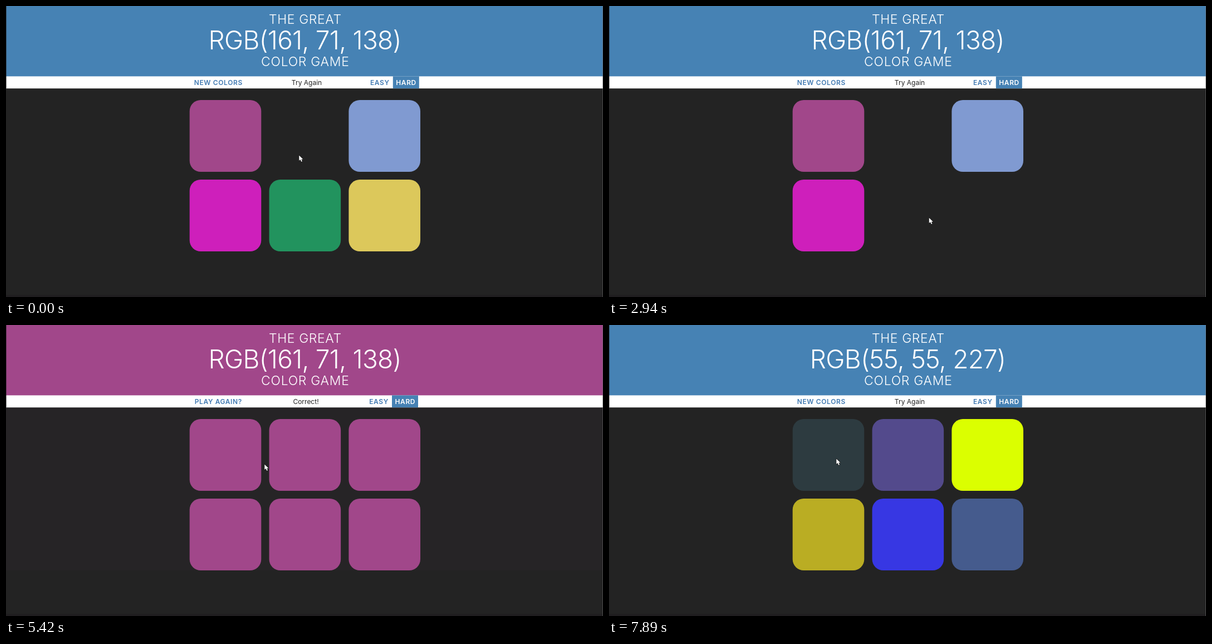
Animation of 1072 by 523 pixels, one loop 8 s. Source, as an HTML page with a canvas:

```html
<!DOCTYPE html>
<html lang="en">
<head>
<meta charset="utf-8">
<title>Color game</title>
<style>
  html, body { margin: 0; width: 100%; height: 100%; overflow: hidden; background: #232323; }
  canvas { display: block; width: 1072px; height: 523px; }
</style>
</head>
<body>
<canvas id="stage" width="1072" height="523"></canvas>
<script>
const ctx = document.getElementById('stage').getContext('2d');
const FONT = 'Inter, "Open Sans", sans-serif';
const BLUE = [70, 130, 180], GOAL = [161, 71, 138];
const LOOP = 8000, TICK = 143.3;
const NAV_TOP = 126.4, NAV_HEIGHT = 21.8;

// Moments of the clicks
const HIDE_GREEN = 2150, HIDE_YELLOW = 540, WIN = 3475, RESET = 6635, RETRY = 7691;

const firstRound = [GOAL, GOAL, [128, 154, 209], [206, 31, 187], [34, 147, 94], [220, 200, 91]];
const secondRound = [[86, 154, 178], [83, 74, 140], [219, 255, 0], [186, 173, 35], [55, 55, 227], [69, 91, 141]];
const firstHides = { 1: -LOOP, 4: HIDE_GREEN, 5: HIDE_YELLOW };
const secondHides = { 0: RETRY };

// The picture advances in bursts of ticks: [start, ticks]
const bursts = [[0, 1], [150, 2], [580, 3], [1780, 6], [2940, 7], [5420, 4], [6270, 8], [7460, 4]];

// Pointer moves: [start, end, x, y]
const moves = [
  [0, 0, 526, 268],
  [20, 290, 660, 379],
  [1660, 1780, 656, 383],
  [1780, 2070, 577, 382],
  [2900, 3400, 437, 279],
  [5250, 5420, 464, 250],
  [5420, 5710, 524, 134],
  [6120, 6420, 380, 136],
  [7416, 7750, 408, 240]
];

const clamp = v => Math.min(1, Math.max(0, v));
const lerp = (a, b, p) => a + (b - a) * p;
const mix = (a, b, p) => a.map((v, i) => Math.round(lerp(v, b[i], p)));
const css = c => `rgb(${c.join()})`;
const smooth = p => p * p * (3 - 2 * p);

function snap(t) {
  const [start, ticks] = bursts.filter(b => b[0] <= t).pop();
  return start + TICK * Math.min(ticks, Math.floor((t - start + 15) / TICK));
}

// The CSS "ease" curve, cubic-bezier(.25, .1, .25, 1)
function ease(x) {
  const bezier = (a, b, s) => 3 * a * s * (1 - s) ** 2 + 3 * b * s * s * (1 - s) + s ** 3;
  let lo = 0, hi = 1;
  for (let i = 0; i < 14; i++) {
    const mid = (lo + hi) / 2;
    if (bezier(.25, .25, mid) < x) lo = mid; else hi = mid;
  }
  return bezier(.1, 1, hi);
}

function fade(t, start, duration = 400) {
  const p = clamp((t - start) / duration);
  return p % 1 ? ease(p) : p;
}

function pointerAt(t) {
  return moves.reduce(([px, py], [start, end, x, y]) => {
    const p = end > start ? smooth(clamp((t - start) / (end - start))) : 1;
    return [lerp(px, x, p), lerp(py, y, p)];
  }, [0, 0]);
}

function rect(x, y, w, h, color) {
  ctx.fillStyle = color;
  ctx.fillRect(x, y, w, h);
}

function text(str, x, y, size, color, weight = 400, spacing = 0) {
  ctx.font = `${weight} ${size}px ${FONT}`;
  ctx.letterSpacing = spacing + 'px';
  ctx.textAlign = 'center';
  ctx.fillStyle = color;
  ctx.fillText(str, x + spacing / 2, y);
}

function button(label, x, width, active) {
  if (active) rect(x - width / 2, NAV_TOP, width, NAV_HEIGHT, css(BLUE));
  text(label, x, 141.5, 12, active ? '#fff' : '#427ab2', 600, .6);
}

function drawSquares(t) {
  const reset = t >= RESET;
  const hides = reset ? secondHides : firstHides;
  const won = reset ? 0 : fade(t, WIN);
  const fresh = fade(t, RESET, 600);
  for (let i = 0; i < 6; i++) {
    const color = reset ? mix(GOAL, secondRound[i], fresh) : mix(firstRound[i], GOAL, won);
    ctx.globalAlpha = Math.max(1 - fade(t, hides[i] ?? LOOP), won * won);
    ctx.fillStyle = css(color);
    ctx.beginPath();
    ctx.roundRect(329.7 + i % 3 * 142.85, 169 + Math.floor(i / 3) * 143, 128.6, 129, 20);
    ctx.fill();
  }
  ctx.globalAlpha = 1;
}

function drawHeader(t, won) {
  rect(0, 0, 1072, 127, css(won ? GOAL : BLUE));
  text('THE GREAT', 537, 32, 23, '#fff', 300, .6);
  text(t < RESET ? 'RGB(161, 71, 138)' : 'RGB(55, 55, 227)', 537, 78, 46, '#fff', 300, -.75);
  text('COLOR GAME', 537, 108, 23, '#fff', 300, .7);
}

function drawNav(t, won, [x, y]) {
  rect(0, NAV_TOP, 1072, NAV_HEIGHT, '#fff');
  const hover = Math.abs(x - 381) < 48 && Math.abs(y - 137) < 11;
  const shift = won ? -1.8 : 0;
  button(won ? 'PLAY AGAIN?' : 'NEW COLORS', 381, 97 + shift * 2, hover);
  button('EASY', 671 + shift, 41, false);
  button('HARD', 718.3 + shift, 47, true);
  if (won) text('Correct!', 538.5, 141.5, 12, '#232323');
  else if (t < RESET || t >= RETRY) text('Try Again', 540, 141.5, 12, '#232323');
}

function drawPointer([x, y]) {
  ctx.save();
  ctx.translate(x + .3, y + .5);
  ctx.beginPath();
  [[0, 0], [0, 9.6], [2.3, 7.6], [4, 11.4], [5.7, 10.6], [4.1, 7], [7.2, 7]]
    .forEach(([px, py]) => ctx.lineTo(px, py));
  ctx.closePath();
  ctx.lineJoin = 'round';
  ctx.lineWidth = 1.2;
  ctx.strokeStyle = '#111';
  ctx.stroke();
  ctx.fillStyle = '#fff';
  ctx.fill();
  ctx.restore();
}

function draw(t) {
  const won = t >= WIN && t < RESET;
  const pointer = pointerAt(t);
  rect(0, 0, 1072, 523, '#232323');
  if (won) rect(0, 148, 1072, 293, '#262426');
  rect(0, 519, 1072, 4, '#201e20');
  drawHeader(t, won);
  drawNav(t, won, pointer);
  rect(0, 0, 1, 148, 'rgba(35, 35, 35, .6)');
  rect(1071, 0, 1, 523, 'rgba(100, 100, 100, .6)');
  drawSquares(t);
  drawPointer(pointer);
}

const start = performance.now();
function tick() {
  draw(snap((performance.now() - start) % LOOP));
  requestAnimationFrame(tick);
}
tick();
</script>
</body>
</html>
```
